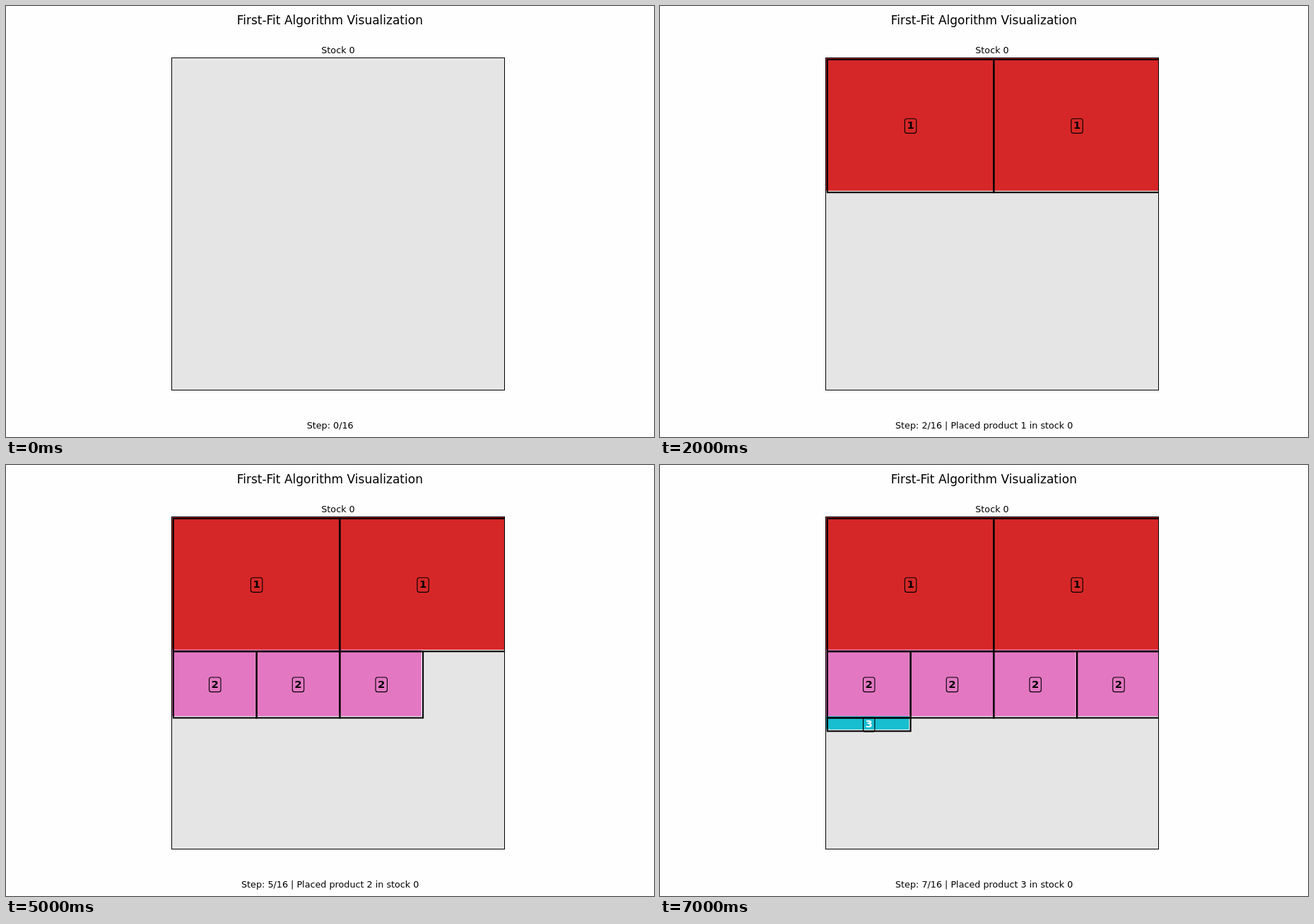
An HTML page that plays this animation: 917 by 611 pixels, repeating every 8000 ms.

```html
<!DOCTYPE html>
<html lang="en">
<head>
<meta charset="utf-8">
<title>First-Fit Algorithm Visualization</title>
<style>
  html, body { margin: 0; width: 100%; height: 100%; overflow: hidden; background: #fefefe; }
  svg { display: block; width: 917px; height: 611px; }
  text { font-family: "DejaVu Sans", sans-serif; font-size: 12.75px; text-anchor: middle; }
  .title { font-size: 17px; }
  .edge { fill: none; stroke: #000; stroke-width: 2.1; }
  .badge { fill: none; stroke: #000; stroke-width: 1.1; }
  .num { font-size: 14.9px; font-weight: bold; }
</style>
</head>
<body>
<svg viewBox="0 0 917 611">
  <clipPath id="area"><rect x="234.5" y="73.5" width="471" height="471"/></clipPath>
  <text class="title" x="458.3" y="26">First-Fit Algorithm Visualization</text>
  <text x="470" y="67">Stock 0</text>
  <rect x="234.5" y="73.5" width="471" height="471" fill="#e5e5e5"/>
  <g clip-path="url(#area)">
    <g id="fills"></g>
    <g id="edges"></g>
  </g>
  <rect x="234.5" y="73.5" width="471" height="471" fill="none" stroke="#000"/>
  <g id="labels"></g>
  <text id="status" x="458.7" y="599"></text>
</svg>
<script>
const UNIT = 4.71, LEFT = 234.5, TOP = 73.5, HALF = UNIT / 2;
const STEP = 1000, LOOP = 8000;
const kinds = {
  1: { w: 50, h: 40, color: '#d62728', ink: '#000' },
  2: { w: 25, h: 20, color: '#e377c2', ink: '#000' },
  3: { w: 25, h: 4, color: '#17becf', ink: '#fff' }
};
// product, column, row
const placed = [
  [1, 0, 0], [1, 50, 0],
  [2, 0, 40], [2, 25, 40], [2, 50, 40], [2, 75, 40],
  [3, 0, 60]
];

const byId = id => document.getElementById(id);

function add(parent, tag, attrs) {
  const el = document.createElementNS('http://www.w3.org/2000/svg', tag);
  for (const key in attrs) el.setAttribute(key, attrs[key]);
  return parent.appendChild(el);
}

const pieces = placed.map(([id, col, row]) => {
  const { w, h, color, ink } = kinds[id];
  const x = LEFT + col * UNIT, y = TOP + row * UNIT;
  const width = w * UNIT, height = h * UNIT;
  const cx = x + HALF + width / 2, cy = y + HALF + height / 2;

  const fill = add(byId('fills'), 'g');
  add(fill, 'rect', { x, y, width: width + 1.3, height: height + 1.3, fill: '#f0f0f0' });
  add(fill, 'rect', { x, y, width, height, fill: color });

  const edge = add(byId('edges'), 'rect', { class: 'edge', x: x + HALF, y: y + HALF, width, height });

  const label = add(byId('labels'), 'g');
  add(label, 'rect', { class: 'badge', x: cx - 8.2, y: cy - 10.3, width: 16.4, height: 20.6, rx: 3 });
  add(label, 'text', { class: 'num', x: cx, y: cy + 4.3, fill: ink }).textContent = id;

  return [fill, edge, label];
});

let shown = -1;
function show(step) {
  if (step === shown) return;
  shown = step;
  pieces.forEach((parts, i) => parts.forEach(p => p.style.display = i < step ? '' : 'none'));
  byId('status').textContent = `Step: ${step}/16` +
    (step ? ` | Placed product ${placed[step - 1][0]} in stock 0` : '');
}

function tick() {
  show(Math.floor(performance.now() % LOOP / STEP));
  requestAnimationFrame(tick);
}
tick();
</script>
</body>
</html>
```
